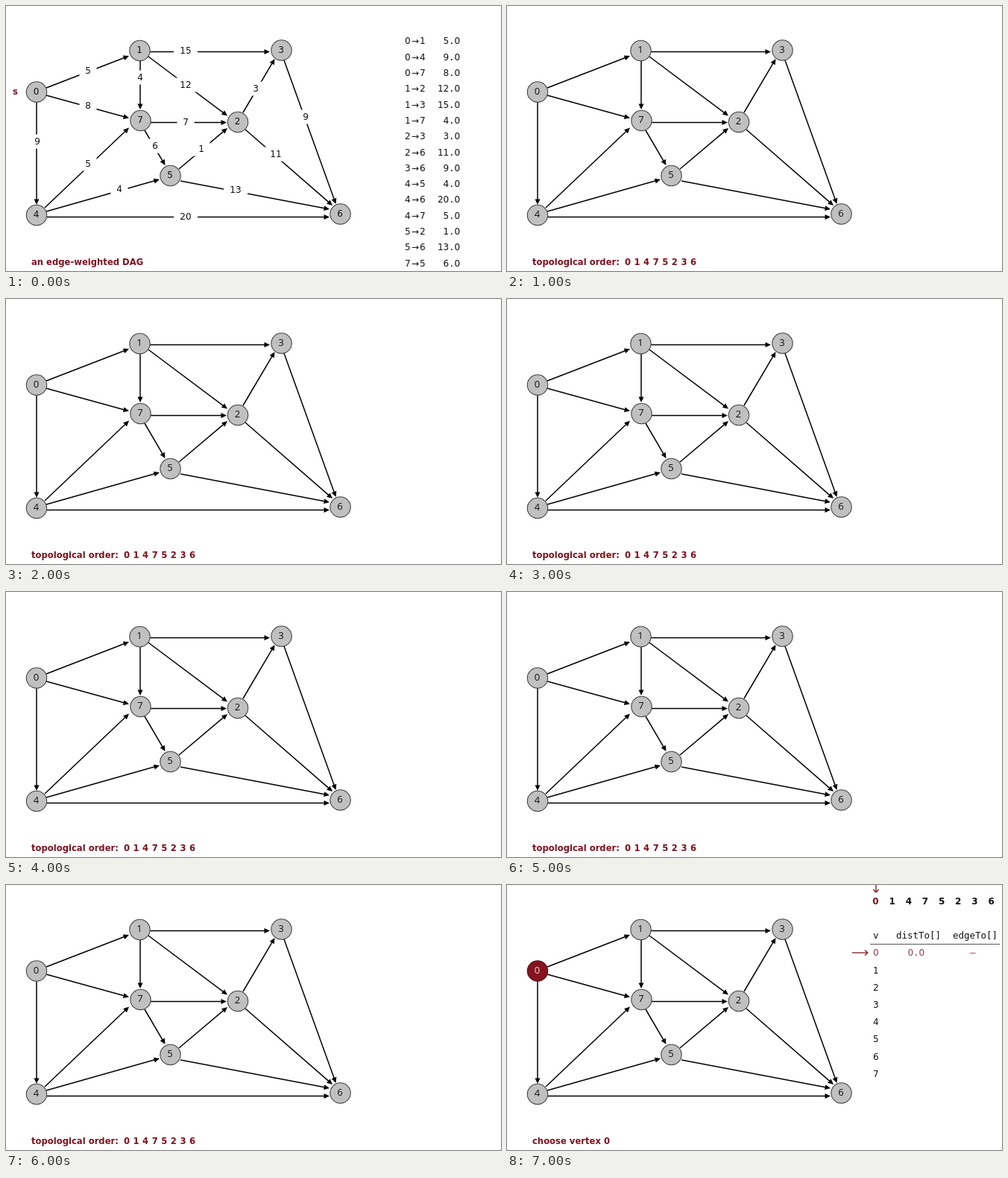
Write an HTML page with a canvas that moves like this. It is 664 by 356 pixels and loops after 8 s.

```html
<!DOCTYPE html>
<html lang="en">
<head>
<meta charset="utf-8">
<title>Shortest paths in an edge-weighted DAG</title>
<style>
html, body { margin: 0; overflow: hidden; background: #fff; }
canvas { display: block; }
</style>
</head>
<body>
<canvas id="stage" width="664" height="356"></canvas>
<script>
const ctx = document.getElementById('stage').getContext('2d');
const LOOP = 8000, RED = '#7d1420', BLACK = '#111';
const SANS = '"DejaVu Sans", sans-serif';
const PLAIN = '"Open Sans", sans-serif';
const MONO = '"DejaVu Sans Mono", monospace';
const ORDER = '01475236';

const nodes = [[41, 115.5], [179.5, 60], [311, 156], [369.5, 59.5],
               [41, 281], [220.5, 228], [448.5, 279.5], [180.5, 154]];

// from-to, weight, line start, arrow tip, label centre
const edges = [
  ['01', 5, 54, 110, 165, 67, 110, 87],
  ['04', 9, 41, 129, 41, 267, 42, 182],
  ['07', 8, 54, 120, 165, 150.5, 110, 134],
  ['12', 12, 191, 68, 297, 147.5, 241, 106],
  ['13', 15, 193, 61.5, 354, 61.5, 241, 59.5],
  ['17', 4, 180, 74, 180, 139, 180, 96],
  ['23', 3, 318, 143, 360.5, 71, 335, 111],
  ['26', 11, 321, 166, 438, 268, 362, 199],
  ['36', 9, 373, 73, 442.5, 266, 402, 149],
  ['45', 4, 54, 276, 206, 233, 152, 245.5],
  ['46', 20, 55, 283.5, 434, 283.5, 241, 283],
  ['47', 5, 52, 271, 165, 163.5, 110, 212],
  ['52', 1, 232, 219, 297, 164, 262, 192],
  ['56', 13, 234, 235, 434, 273, 308, 247],
  ['75', 6, 186, 167, 213.5, 214, 200, 188],
  ['72', 7, 194, 156.5, 296, 156.5, 241, 155.5]
];

function text(str, x, y, font, color = BLACK, align = 'center') {
  ctx.font = font;
  ctx.fillStyle = color;
  ctx.textAlign = align;
  ctx.fillText(str, x, y + 4.4);
}

// Fixed-pitch text with undotted zeros
function typed(str, x, y, color) {
  [...str].forEach((c, i) =>
    text(c, x + 7.5 * (i + 0.5), y, /\d/.test(c) ? '12px ' + SANS : '12.5px ' + MONO, color));
}

function caption(str) {
  text(str, 34, 343.5, 'bold 11.6px ' + SANS, RED, 'left');
}

function line(x1, y1, x2, y2, color, width) {
  ctx.strokeStyle = color;
  ctx.lineWidth = width;
  ctx.beginPath();
  ctx.moveTo(x1, y1);
  ctx.lineTo(x2, y2);
  ctx.stroke();
}

function arrow(x1, y1, x2, y2) {
  const a = Math.atan2(y2 - y1, x2 - x1);
  line(x1, y1, x2 - 4 * Math.cos(a), y2 - 4 * Math.sin(a), '#000', 1.5);
  ctx.save();
  ctx.translate(x2, y2);
  ctx.rotate(a);
  ctx.fillStyle = '#000';
  ctx.beginPath();
  ctx.moveTo(0, 0);
  ctx.lineTo(-7.5, -3.5);
  ctx.lineTo(-7.5, 3.5);
  ctx.fill();
  ctx.restore();
}

function pointer(x, y, angle, length) {
  ctx.save();
  ctx.translate(x, y);
  ctx.rotate(angle);
  line(-length, 0, 0, 0, RED, 1.3);
  line(-4, -3.5, 0, 0, RED, 1.3);
  line(-4, 3.5, 0, 0, RED, 1.3);
  ctx.restore();
}

function graph(weighted, chosen) {
  for (const [, weight, x1, y1, x2, y2, lx, ly] of edges) {
    arrow(x1, y1, x2, y2);
    if (!weighted) continue;
    const half = 7 + 4.5 * String(weight).length;
    ctx.fillStyle = '#fff';
    ctx.fillRect(lx - half, ly - 9.5, 2 * half, 19);
    text(weight, lx, ly, '12px ' + SANS);
  }
  nodes.forEach(([x, y], i) => {
    const on = i === chosen;
    ctx.beginPath();
    ctx.arc(x, y, 13.7, 0, 2 * Math.PI);
    ctx.fillStyle = on ? '#86131f' : '#c0c0c0';
    ctx.fill();
    ctx.strokeStyle = on ? '#4a1016' : '#444';
    ctx.lineWidth = 1.1;
    ctx.stroke();
    text(i, x - 0.5, y - 1, weighted ? '12px ' + SANS : '13px ' + PLAIN, on ? '#f0d0d0' : BLACK);
  });
}

function weightsScene() {
  graph(true);
  text('s', 12.5, 115, 'bold 11.6px ' + SANS, RED);
  edges.forEach(([[from, to], weight], i) => {
    const y = 47 + 21.3 * i, value = weight.toFixed(1);
    typed(from, 535, y);
    text('→', 548.7, y, '12px ' + SANS);
    typed(to, 555, y);
    typed(value, 609 - 7.5 * value.length, y);
  });
  caption('an edge-weighted DAG');
}

function orderScene() {
  graph(false);
  caption('topological order:');
  [...ORDER].forEach((d, i) => text(d, 162 + 12.57 * i, 343.5, 'bold 11.6px ' + SANS, RED));
}

function chooseScene() {
  graph(false, 0);
  caption('choose vertex 0');
  pointer(495, 10, Math.PI / 2, 12);
  [...ORDER].forEach((d, i) =>
    text(d, 494.5 + 22.15 * i, 22, 'bold 12px ' + SANS, i ? BLACK : RED));
  typed('v', 491, 68);
  typed('distTo[]', 522, 68);
  typed('edgeTo[]', 598, 68);
  line(487, 79.5, 661, 79.5, '#555', 1);
  pointer(484, 91, 0, 21);
  for (let i = 0; i < 8; i++) typed(String(i), 491, 91 + 23.2 * i, i ? BLACK : '#9a3a48');
  typed('0.0', 537.5, 91, '#9a3a48');
  typed('–', 621, 91, '#9a3a48');
}

function draw() {
  const t = performance.now() % LOOP;
  ctx.fillStyle = '#fff';
  ctx.fillRect(0, 0, 664, 356);
  (t < 1000 ? weightsScene : t < 7000 ? orderScene : chooseScene)();
  requestAnimationFrame(draw);
}
draw();
</script>
</body>
</html>
```
